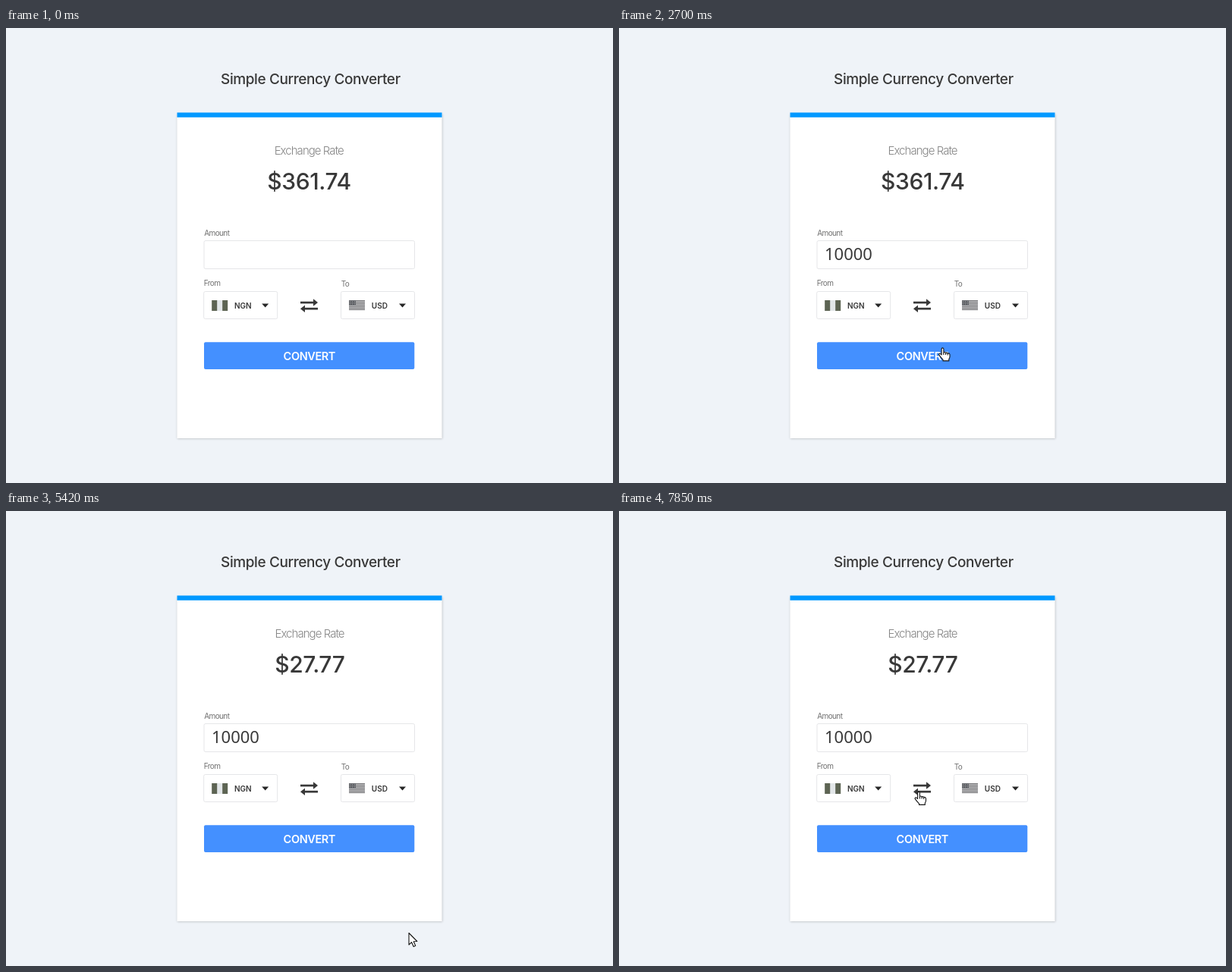
An HTML page with a canvas for the animation above (8 s loop, 800 px wide and 600 px high).

```html
<!DOCTYPE html>
<html lang="en">
<head>
<meta charset="utf-8">
<title>Simple Currency Converter</title>
<style>
  html, body { margin: 0; width: 100%; height: 100%; overflow: hidden; background: #eff3f8; }
  canvas { display: block; width: 800px; height: 600px; }
</style>
</head>
<body>
<canvas id="stage"></canvas>
<script>
const canvas = document.getElementById('stage');
const ratio = window.devicePixelRatio || 1;
canvas.width = 800 * ratio;
canvas.height = 600 * ratio;
const ctx = canvas.getContext('2d');

const LOOP = 8000;
const BLUE = '#4490ff', PALE = '#eff3f8', DARK = '#383838', GREY = '#858585';
const INTER = 'Inter, Roboto, sans-serif';

// Times of the state changes
const TYPED = 1620, PRESSED = 3480, DONE = 5420;

// Cursor moves: start, end, number of steps, points passed
const MOVES = [
  { from: 210, to: 910, steps: 10, path: [[564, 563], [440, 430], [350, 315], [315, 289]], enter: true },
  { from: 1620, to: 1620, steps: 1, path: [[315, 289], [320.5, 289]] },
  { from: 2010, to: 2700, steps: 10, path: [[320.5, 289], [362, 338], [402, 392], [426, 421.5]] },
  { from: 4110, to: 4260, steps: 3, path: [[426, 421.5], [462, 467], [500, 520], [531.5, 555.5]] },
  { from: 5420, to: 5420, steps: 1, path: [[531.5, 555.5], [530.5, 556]] },
  { from: 6130, to: 6600, steps: 7, path: [[530.5, 556], [468, 462], [400, 355], [356.5, 293]] },
  { from: 6980, to: 7770, steps: 11, path: [[356.5, 293], [339, 330], [344, 379], [370, 381], [392, 371]] },
  { from: 7850, to: 7850, steps: 1, path: [[392, 371], [394.5, 370]] }
];

const ease = p => p * p * (3 - 2 * p);

function along(path, p) {
  const s = p * (path.length - 1);
  const i = Math.min(Math.floor(s), path.length - 2);
  const f = s - i;
  return [0, 1].map(k => path[i][k] + (path[i + 1][k] - path[i][k]) * f);
}

function cursorAt(t) {
  const move = MOVES.filter(m => t >= m.from).pop();
  if (!move) return null;
  const { from, to, steps, path, enter } = move;
  if (t >= to) return path[path.length - 1];
  const k = Math.floor((t - from) / (to - from) * (steps - 1));
  return along(path, ease(enter ? k / (steps - 1) : (k + 1) / steps));
}

const inside = ([x, y], l, t, r, b) => x > l && x < r && y > t && y < b;

function isHand(pos, t) {
  if (t >= 4110 && t < DONE) return true;
  return inside(pos, 261, 414, 538, 450) || inside(pos, 386, 355, 412, 377);
}

function box(x, y, w, h, fill, stroke) {
  ctx.beginPath();
  ctx.roundRect(x, y, w, h, 2);
  ctx.fillStyle = fill;
  ctx.fill();
  if (stroke) {
    ctx.strokeStyle = stroke;
    ctx.lineWidth = 1;
    ctx.stroke();
  }
}

function rect(x, y, w, h, fill) {
  ctx.fillStyle = fill;
  ctx.fillRect(x, y, w, h);
}

function poly(points, fill) {
  ctx.beginPath();
  points.forEach(([x, y]) => ctx.lineTo(x, y));
  ctx.closePath();
  ctx.fillStyle = fill;
  ctx.fill();
}

function text(str, x, y, { size, weight = 400, color = DARK, gap = 0, align = 'left', family = INTER }) {
  ctx.font = `${weight} ${size}px ${family}`;
  ctx.letterSpacing = gap + 'px';
  ctx.textAlign = align;
  ctx.fillStyle = color;
  ctx.fillText(str, x, y);
}

function card() {
  ctx.save();
  ctx.shadowColor = 'rgba(0, 0, 0, 0.24)';
  ctx.shadowBlur = 3 * ratio;
  ctx.shadowOffsetX = 0.5 * ratio;
  ctx.shadowOffsetY = 1.2 * ratio;
  rect(225.5, 111.5, 349, 429.5, '#fff');
  ctx.restore();
  rect(225.5, 111.5, 349, 6.3, '#0098ff');
}

function select(x, code, flag) {
  box(x, 347.5, 97, 36, '#fff', '#e5e6e8');
  flag(x + 10.5, 359);
  text(code, x + 40.3, 369.5, { size: 10, weight: 600 });
  const cx = x + 81;
  poly([[cx - 4.5, 363.5], [cx + 4.5, 363.5], [cx, 368.5]], '#262626');
}

function bandFlag(x, y) {
  rect(x, y, 21, 14, '#5d6453');
  rect(x + 7, y, 7, 14, '#e3e7e9');
}

function stripeFlag(x, y) {
  rect(x, y, 21, 13, '#d3d3d5');
  for (let i = 0; i < 7; i++) rect(x, y + i * 2, 21, 1, '#6a6a6c');
  rect(x, y, 9, 7, '#66686c');
  for (let i = 0; i < 6; i++) rect(x + 1 + (i % 3) * 3, y + 1.5 + Math.floor(i / 3) * 3, 1, 1, '#a4a6aa');
}

function swapIcon() {
  rect(388, 360.7, 18, 2.7, DARK);
  poly([[405, 357.3], [411, 362], [405, 366.7]], DARK);
  rect(393, 368.8, 18, 2.7, DARK);
  poly([[394, 365.5], [388, 370.2], [394, 374.9]], DARK);
}

const ARROW = new Path2D('M.5 .5V16L4.1 12.7 6.7 18.4 9.2 17.3 6.7 11.7 11.3 11.5Z');
const HAND = new Path2D('M-.9 9.5V1.8a1.4 1.4 0 0 1 2.8 0V6.4q1.4-.9 2.7.5q1.5-.7 2.6.6q2.3-.5 2.8 1.7' +
  'V12q-.1 1.8-1.2 3.2V17.4H1V15.8Q-2.6 12.2-4.4 9.4Q-4.6 7.6-2.8 7.9Q-1.7 8.4-.9 9.5Z');
const KNUCKLES = new Path2D('M1.9 6.4V9.4M4.6 6.9V9.6M7.2 7.5V10');

function cursor(pos, hand) {
  const shape = hand ? HAND : ARROW;
  ctx.save();
  ctx.translate(...pos);
  ctx.lineJoin = 'round';
  ctx.lineWidth = 1.1;
  ctx.strokeStyle = '#151515';
  ctx.fillStyle = '#fff';
  ctx.fill(shape);
  ctx.stroke(shape);
  if (hand) ctx.stroke(KNUCKLES);
  ctx.restore();
}

function draw(t) {
  ctx.setTransform(ratio, 0, 0, ratio, 0, 0);
  rect(0, 0, 800, 600, PALE);
  text('Simple Currency Converter', 401.3, 74, { size: 19, weight: 500, gap: -0.4, align: 'center' });
  card();

  const mid = t < TYPED ? 399.5 : 400.3;
  text('Exchange Rate', mid - 0.3, 167, { size: 15, weight: 300, color: GREY, gap: -0.95, align: 'center' });
  text(t < DONE ? '$361.74' : '$27.77', mid, 213, { size: 30, weight: 500, gap: -0.4, align: 'center' });

  const label = { size: 10, color: '#707070', gap: -0.6 };
  text('Amount', 261.2, 274, label);
  text('From', 260.8, 340, label);
  text('To', 441.8, 341, label);

  box(261, 280.5, 277.5, 37, '#fff', '#e5e6e8');
  if (t >= TYPED) text('10000', 271, 306, { size: 22, weight: 500, family: '"Noto Sans", "Open Sans", sans-serif' });

  select(260.7, 'NGN', bandFlag);
  select(441.5, 'USD', stripeFlag);
  swapIcon();

  const working = t >= PRESSED && t < DONE;
  box(261, 414.3, 277.3, 35.7, working ? PALE : BLUE);
  text(working ? 'WORKING...' : 'CONVERT', 399.8, 437.8,
    { size: 14.5, weight: 600, color: working ? BLUE : '#fff', gap: -0.4, align: 'center' });

  const pos = cursorAt(t);
  if (pos) cursor(pos, isHand(pos, t));
}

const start = performance.now();
function tick() {
  draw((performance.now() - start) % LOOP);
  requestAnimationFrame(tick);
}
tick();
</script>
</body>
</html>
```
